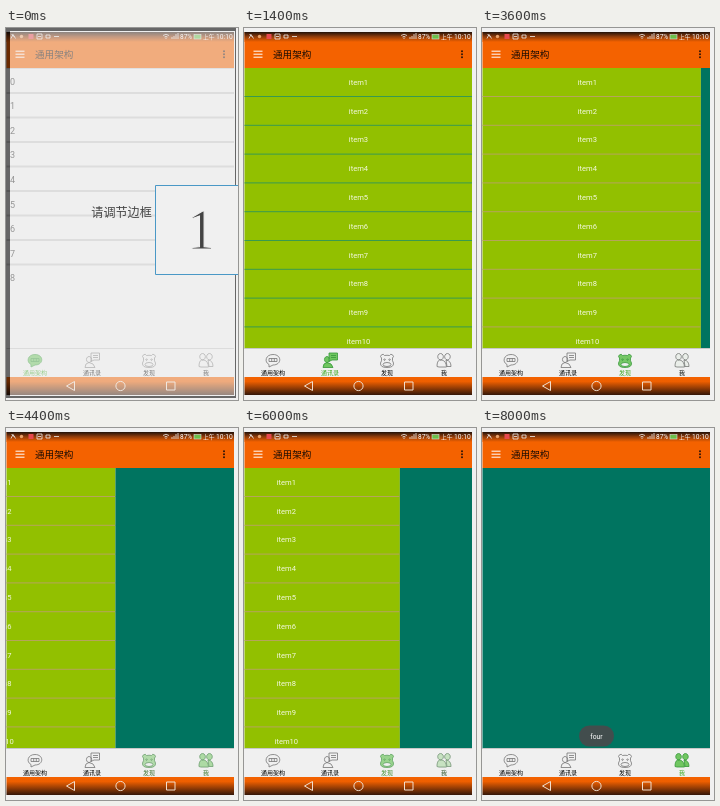
Animation, 232 px wide and 372 px high, one loop 8200 ms. Source, as an HTML page:

```html
<!DOCTYPE html>
<html lang="zh">
<head>
<meta charset="utf-8">
<style>
html, body { margin: 0; width: 100%; height: 100%; overflow: hidden; background: #f0f0f0; }
svg { display: block; width: 232px; height: 372px; font-family: Roboto, "Noto Sans CJK SC", "Noto Sans CJK", sans-serif; }
.mid { text-anchor: middle; }
.item { font-size: 7.6px; fill: #f4f8e0; }
.tab { font-size: 6px; font-weight: 500; }
.line { fill: none; stroke: #777; stroke-width: .8; }
.on path { fill: #70c660; stroke: #37983a; stroke-width: .8; }
.on text { fill: #3aa81e; }
</style>
</head>
<body>
<svg viewBox="0 0 232 372">
  <defs>
    <linearGradient id="top" x2="0" y2="1">
      <stop stop-color="#211109"/><stop offset=".45" stop-color="#8c3a0a"/><stop offset="1" stop-color="#f46200"/>
    </linearGradient>
    <linearGradient id="bottom" x2="0" y2="1">
      <stop stop-color="#f46200"/><stop offset=".25" stop-color="#ee5f00"/><stop offset="1" stop-color="#35170a"/>
    </linearGradient>
    <clipPath id="screen"><path d="M.5 40H228V321H.5z"/></clipPath>
  </defs>
  <rect width="232" height="372" fill="#f0f0f0"/>
  <g clip-path="url(#screen)"><g id="pages"></g></g>

  <rect x=".5" y="4" width="227.500" height="36" fill="#f46200"/>
  <rect x=".5" y="4" width="227.500" height="10" fill="url(#top)"/>
  <g fill="none" stroke="#eee" stroke-width=".8">
    <path d="M5 10.500l2-4l2.500 4M5.500 6l3 3M31 6h5v5h-5zM32 8.500h3M40 7h4v3h-4zM48 8.500h5"/>
    <path d="M157 7.500q3-2.500 6 0M158.500 9q1.500-1.300 3 0M160 9.500v1.500M166 11v-2M168 11v-3M170 11v-5M172 11v-6"/>
  </g>
  <circle cx="15.500" cy="8.500" r="1.700" fill="#e9a06a"/>
  <rect x="22.500" y="6" width="5" height="5" fill="#e5484d"/>
  <rect x="188" y="6.500" width="7" height="4.500" fill="#6cc04a" stroke="#ddd" stroke-width=".6"/>
  <g fill="#fff" font-size="6.500">
    <text x="174" y="11">87%</text>
    <text x="197" y="11" font-size="5.800">上午</text>
    <text x="210" y="11" font-size="6.700">10:10</text>
  </g>
  <path d="M9.500 23.200h9M9.500 26.200h9M9.500 29.200h9" stroke="#fff"/>
  <text x="29" y="30" font-size="9.600" font-weight="500" fill="#1c0d04">通用架构</text>
  <g fill="#30150a"><circle cx="218" cy="23.200" r="1"/><circle cx="218" cy="26.200" r="1"/><circle cx="218" cy="29.200" r="1"/></g>

  <rect x=".5" y="320" width="227.500" height="29" fill="#f0f0f0"/>
  <rect x=".5" y="320" width="227.500" height="1" fill="#c8c8c8"/>
  <g id="tabs"></g>
  <rect x=".5" y="349" width="227.500" height="18" fill="url(#bottom)"/>
  <g fill="none" stroke="#f0dfd0" stroke-width="1">
    <path d="M68.500 353.500v9l-8-4.500zM160.500 354h8.500v8h-8.500z"/><circle cx="114.500" cy="358" r="4.600"/>
  </g>

  <g id="toast">
    <rect y="297.500" height="21" rx="10.500" fill="#4a4a4c" fill-opacity=".9"/>
    <text class="mid" x="114.500" y="311" font-size="6.800" fill="#fff"></text>
  </g>

  <g id="intro">
    <path d="M4 3H229V368H4z" fill="#f0f0f0" fill-opacity=".52"/>
    <path d="M0 0H230V370H0zM4 3V368H229V3z" fill-opacity=".57" fill-rule="evenodd"/>
    <text x="85.300" y="188.500" font-size="12.100" fill="#444">请调节边框</text>
    <path d="M233 157.500H149.500V246.500H233z" fill="#f0f0f0" stroke="#4a98c6"/>
    <text class="mid" x="195" y="221" font-family="Liberation Serif, serif" font-size="56" fill="#444" stroke="#f0f0f0" stroke-width="1.200">1</text>
  </g>
</svg>
<script>
const LOOP = 8200, STEP = 200, W = 228;
const $ = id => document.getElementById(id);
const repeat = (n, f) => Array.from({ length: n }, (_, i) => f(i)).join('');

const rect = (y, h, fill) => `<rect y="${y}" width="${W}" height="${h}" fill="${fill}"/>`;
const plainList = rect(39, 283, '#f0f0f0') + rect(40, 1, '#d0d0d0') +
  repeat(9, i => `<text x="4" y="${56.5 + 24.6 * i}" font-size="9" fill="#333">${i}</text>`) +
  repeat(8, i => rect(64 + 24.5 * i, 2, '#c9c9c9'));
const greenList = divider => rect(39, 283, '#92c000') +
  repeat(10, i => `<text class="item mid" x="114.5" y="${56.8 + 28.8 * i}">item${i + 1}</text>`) +
  repeat(9, i => rect(68 + 28.8 * i, 1, divider));
const pages = [plainList, greenList('#389a50'), greenList('#b5a45c'), rect(39, 283, '#007460')];
$('pages').innerHTML = pages.map((p, i) => `<g transform="translate(${i * W})">${p}</g>`).join('');

const tabs = [
  ['通用架构', 29, 'M-4 10.500C-9 8 -7.500 .5 0 .5C9 .5 9 11 0 11L-4 13zM-4 4.500h8v3h-8zM-1.300 4.500v3M1.300 4.500v3'],
  ['通讯录', 86, 'M-1 -1H7.500V6H2L-1 7.500zM1 1.500H6M1 3.500H6M-3 2.500a2.600 3 0 1 0 .1 0zM-7 13.500Q-7 9 -3 8.500Q2 9 3 13.500z'],
  ['发现', 143, 'M-2.500 1.500a2 2 0 1 0 -3 2.500Q-5 7 -6.500 9Q-7 13.500 0 13.500Q7 13.500 6.500 9Q5 7 5.500 4a2 2 0 1 0 -3 -2.500Q0 1 -2.500 1.500zM-2.500 5a.7 .7 0 1 0 .1 0zM2.500 5a.7 .7 0 1 0 .1 0zM-4 10.500a4 2 0 1 1 8 0a4 2 0 1 1 -8 0z'],
  ['我', 200, 'M3.500 -.5a2.800 3.200 0 1 1 -.1 0zM2 6Q7 6.500 7 12.500H3zM-3.500 -.5a2.800 3.200 0 1 0 .1 0zM-7 12.500Q-7 7 -4.500 6H-2Q2 7 2.500 13H-5z']
];
$('tabs').innerHTML = tabs.map(([name, x, d]) => {
  const face = `<path class="line" d="${d}"/><text class="tab mid" y="21">${name}</text>`;
  return `<g transform="translate(${x} 326)"><g>${face}</g><g class="on">${face}</g></g>`;
}).join('');

// start, end, page reached
const swipes = [
  [400, 1400, 1], [1600, 2400, 2], [3000, 3200, 2.35], [3400, 3600, 2.04],
  [4000, 4800, 3], [5000, 6600, 2], [7600, 8000, 3]
];
// text, start, end, width
const toasts = [
  ['three', 2600, 3600, 38], ['four', 4800, 5600, 35],
  ['three', 6600, 7800, 38], ['four', 7800, LOOP, 35]
];
const ease = k => k * k * (3 - 2 * k);

function position(t) {
  let p = 0;
  for (const [start, end, to] of swipes) {
    const k = Math.min(1, Math.max(0, (t - start) / (end - start)));
    p += (to - p) * ease(k);
  }
  return p;
}

function draw(now) {
  const t = Math.floor(now % LOOP / STEP) * STEP;
  const p = position(t);
  $('pages').setAttribute('transform', `translate(${-p * W})`);
  [...$('tabs').children].forEach((tab, i) => {
    const a = Math.max(0, 1 - Math.abs(p - i));
    tab.children[0].style.opacity = 1 - a;
    tab.children[1].style.opacity = a;
  });

  const note = toasts.find(([, start, end]) => t >= start && t < end);
  $('toast').style.opacity = !note ? 0 : t < note[1] + STEP ? .5 : 1;
  if (note) {
    const [box, label] = $('toast').children;
    box.setAttribute('x', 114.5 - note[3] / 2);
    box.setAttribute('width', note[3]);
    label.textContent = note[0];
  }
  $('intro').style.display = t < STEP ? '' : 'none';
}

const begin = performance.now();
function tick() {
  draw(performance.now() - begin);
  requestAnimationFrame(tick);
}
tick();
</script>
</body>
</html>
```
